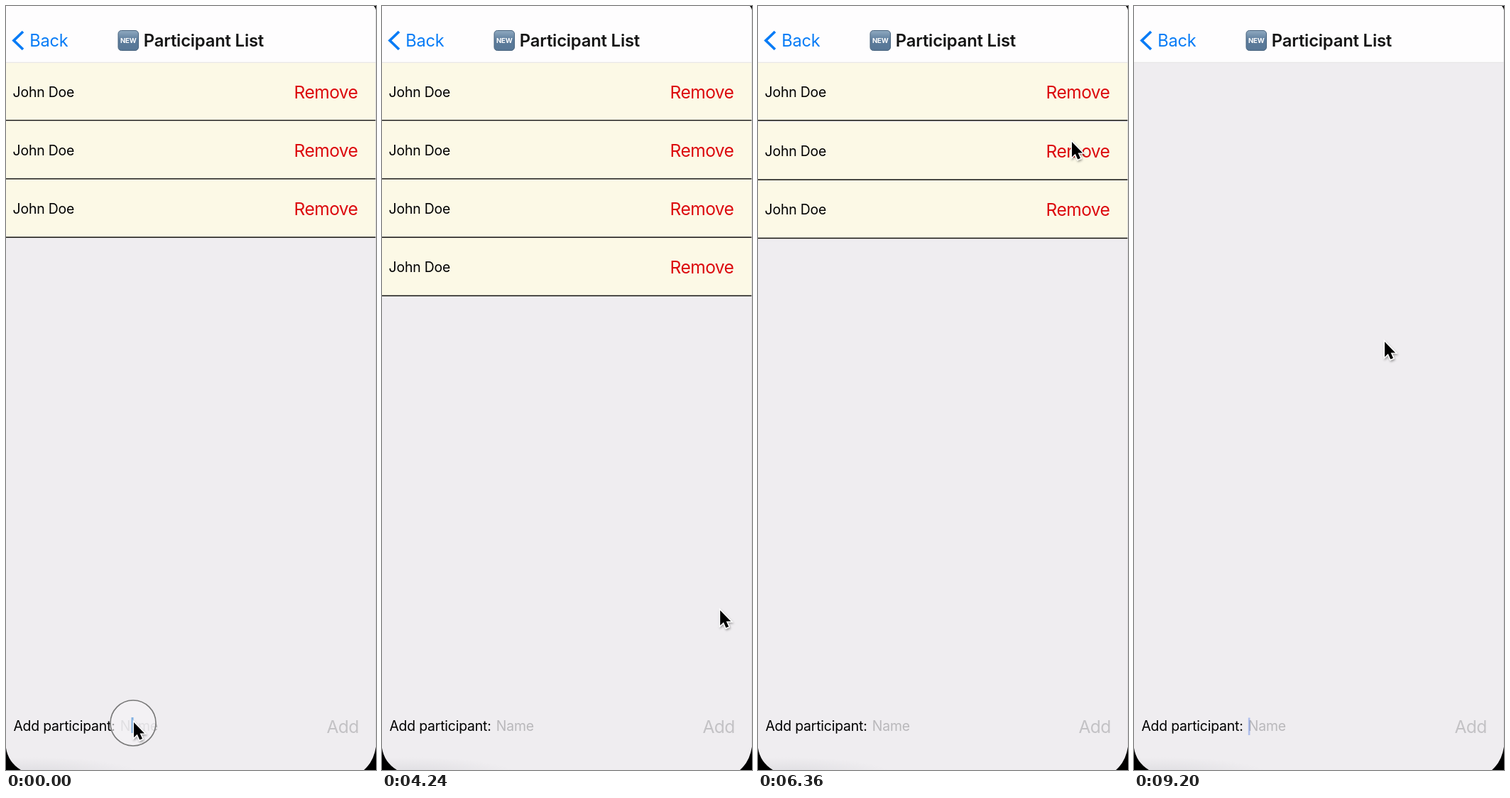
These frames come from a looping animation (521x1074 px, 9.24 s). An HTML page:

```html
<!DOCTYPE html>
<html lang="en">
<head>
<meta charset="utf-8">
<title>Participant List</title>
<style>
  html, body { margin: 0; width: 100%; height: 100%; overflow: hidden; background: #efedf0; }
  svg { display: block; width: 100%; height: 100%; }
  text { font: 19.4px Inter, sans-serif; letter-spacing: -.01em; }
  .title { font-size: 23.8px; font-weight: 600; letter-spacing: -.008em; fill: #151515; }
  .back { font-size: 23.6px; fill: #067bf6; }
  .button { font-size: 24.5px; letter-spacing: -.022em; }
  .badge { font-size: 9.6px; font-weight: 700; letter-spacing: -.02em; fill: #fff; }
</style>
</head>
<body>
<svg viewBox="0 0 521 1074">
  <defs>
    <linearGradient id="steel" x2="0" y2="1">
      <stop stop-color="#8fa9c0"/><stop offset=".5" stop-color="#5b7b9b"/><stop offset="1" stop-color="#587796"/>
    </linearGradient>
    <radialGradient id="shade">
      <stop stop-color="#dddce0"/><stop offset="1" stop-color="#dddce0" stop-opacity="0"/>
    </radialGradient>
    <filter id="shadow" x="-50%" y="-50%" width="200%" height="200%">
      <feDropShadow dx="1" dy="2" stdDeviation="1.5" flood-opacity=".35"/>
    </filter>
    <g id="row">
      <rect width="521" height="82.2" fill="#fcf9e6"/>
      <rect y="80.5" width="521" height="1.5" fill="#111"/>
      <text x="9.6" y="48">John Doe</text>
      <text class="button" x="405.6" y="50.2" fill="#dc0a0e">Remove</text>
    </g>
  </defs>
  <rect width="521" height="1074" fill="#efedf0"/>
  <ellipse cx="40" cy="1080" rx="150" ry="24" fill="url(#shade)"/>
  <g id="rows"></g>

  <rect width="521" height="79.5" fill="#fefdfe"/>
  <rect y="78.8" width="521" height="1" fill="#e4e3e4"/>
  <path d="M24 36 11 48.5 24 61" fill="none" stroke="#067bf6" stroke-width="3.7"/>
  <text class="back" x="33.3" y="57.4">Back</text>
  <rect x="158" y="34.5" width="28.5" height="28" rx="4.5" fill="url(#steel)" stroke="#48637e"/>
  <text class="badge" x="172.2" y="52" text-anchor="middle">NEW</text>
  <text class="title" x="193.8" y="57.2">Participant List</text>

  <text x="10.4" y="1019.3">Add participant:</text>
  <text id="field" x="160.8" y="1019.3"></text>
  <text id="add" class="button" x="451.4" y="1021.5">Add</text>
  <rect id="caret" y="1000.5" width="2.6" height="24.5" fill="#3a69e6"/>

  <g id="loupe">
    <circle cx="179" cy="1008" r="32" fill="#f6f5f8" fill-opacity=".65" stroke="#777" stroke-width="1.6"/>
    <rect x="176.5" y="1000" width="3" height="22" fill="#82b2e2"/>
  </g>
  <g id="popup">
    <path d="M123 924H201a10 10 0 0 1 10 10V965.5a10 10 0 0 1-10 10H175L162 988 149 975.5H123a10 10 0 0 1-10-10V934a10 10 0 0 1 10-10Z" fill="#575558"/>
    <text id="paste" x="135.6" y="956.5">Paste</text>
  </g>

  <path d="M0 1043Q3 1063 21 1074H0ZM521 1041Q518 1062 504 1074H521ZM518 0Q520 2 521 6V0Z"/>
  <path d="M520.6 6V1041" stroke="#d6d5d8" stroke-width=".8"/>
  <path id="cursor" d="M1 2V23.2L5.8 18.8 9.2 26.6 13 25 9.6 17.4H16Z"
    stroke="#fff" stroke-width="2.8" paint-order="stroke" filter="url(#shadow)"/>
</svg>
<script>
const LOOP = 9240, TOP = 79, PITCH = 82.2;
const PASTE = 1180, ADD = 2400;
const $ = id => document.getElementById(id);

// Time at which each row of the list is removed
const removals = [7680, 5942, 6900, 8400];

// Cursor path: time, x, y
const path = [
  [0, 179, 1005], [520, 179, 1005], [960, 154, 951], [1480, 154, 951],
  [2150, 480, 1000], [3950, 480, 1000], [4960, 456, 242], [5350, 446, 200],
  [5950, 446, 200], [6360, 441, 189], [6950, 441, 192], [7400, 443, 120],
  [7690, 443, 120], [8000, 444, 207], [8250, 443, 122], [8430, 443, 122],
  [9150, 352, 470], [LOOP, 352, 470]
];

const rows = removals.map(() => {
  const row = document.createElementNS('http://www.w3.org/2000/svg', 'use');
  row.setAttribute('href', '#row');
  return $('rows').appendChild(row);
});

const ramp = (t, from, to) => Math.min(1, Math.max(0, (t - from) / (to - from)));
const ease = p => p * p * (3 - 2 * p);

// Underdamped spring, going from 0 to 1
function spring(ms) {
  if (ms <= 0) return 0;
  const s = ms / 1000, a = 12.57 * s;
  return 1 - Math.exp(-5.5 * s) * (Math.cos(a) + .4375 * Math.sin(a));
}

function cursorAt(t) {
  const i = path.findIndex(([end]) => end > t);
  const [t0, x0, y0] = path[i - 1], [t1, x1, y1] = path[i];
  const p = ease(ramp(t, t0, t1));
  return [x0 + (x1 - x0) * p, y0 + (y1 - y0) * p];
}

function caretOpacity(t) {
  if (t < 400) return 0;
  if (t > PASTE && t < 1900) return 1;
  const phase = t % 1000;
  return phase < 500 ? 1 - ramp(phase, 130, 240) : ramp(phase, 600, 700);
}

function draw(t) {
  rows.forEach((row, i) => {
    let y = TOP + i * PITCH;
    for (let j = 0; j < i; j++) y -= PITCH * spring(t - removals[j]);
    row.setAttribute('y', y + .5);
    row.setAttribute('opacity', t >= removals[i] ? 0 : i === 3 ? ramp(t, ADD, ADD + 300) : 1);
  });

  const filled = t >= PASTE && t < ADD;
  $('field').textContent = filled ? 'John Doe' : 'Name';
  $('field').setAttribute('fill', filled ? '#000' : '#b9b8bb');
  $('add').setAttribute('fill', filled ? '#067bf6' : '#c3c2c5');
  $('caret').setAttribute('x', filled ? 245.2 : 160.8);
  $('caret').setAttribute('opacity', caretOpacity(t));

  $('loupe').setAttribute('opacity', 1 - ramp(t, 350, 480));
  $('popup').setAttribute('opacity', ramp(t, 480, 640) * (1 - ramp(t, 1320, 1500)));
  $('paste').setAttribute('fill', t > 1100 ? '#c6c5c7' : '#fff');
  $('cursor').setAttribute('transform', `translate(${cursorAt(t)})`);
}

const start = performance.now();
function tick() {
  draw((performance.now() - start) % LOOP);
  requestAnimationFrame(tick);
}
tick();
</script>
</body>
</html>
```
